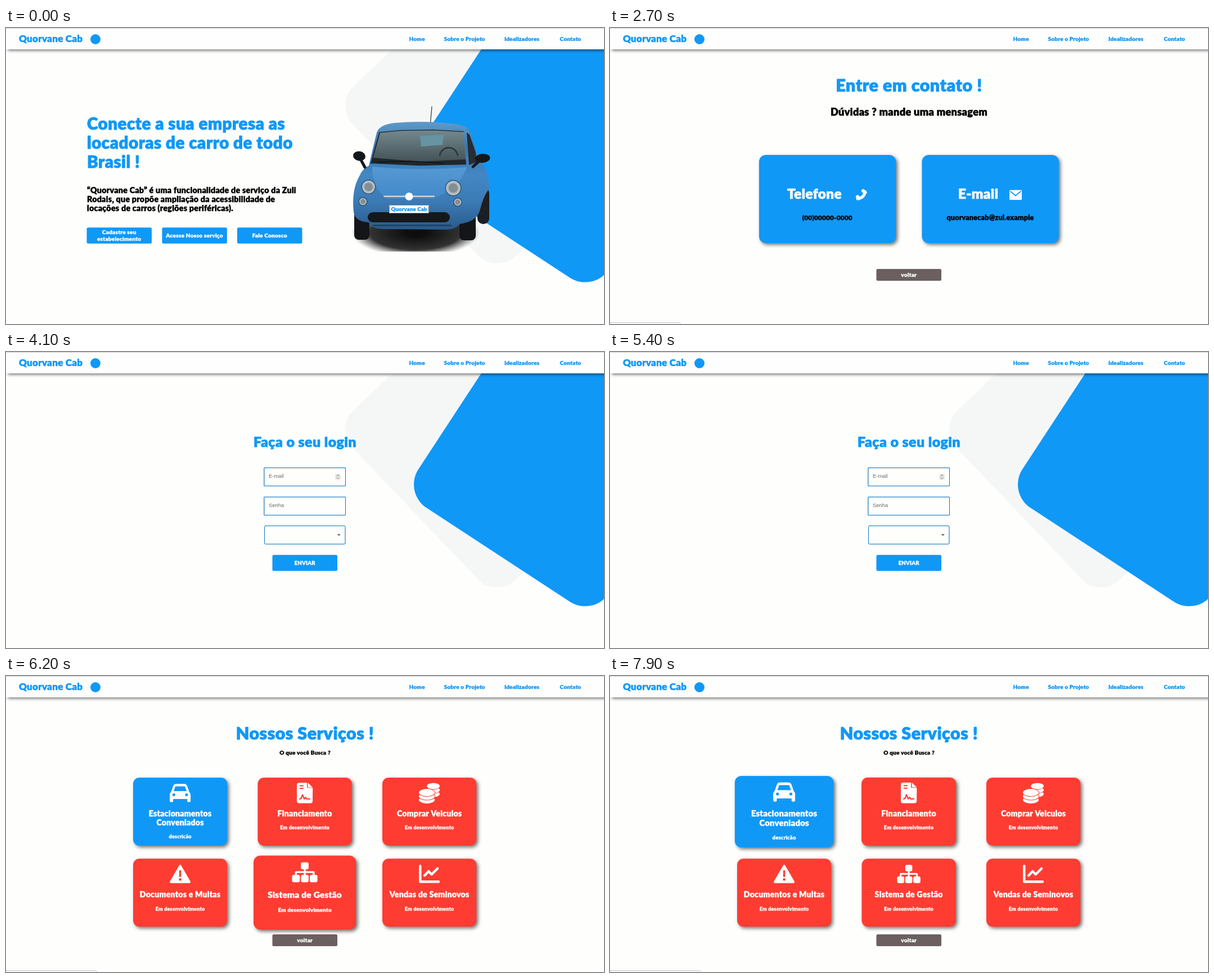
An HTML page with a canvas for the animation above (8 s loop, 1063 by 527 pixels).

```html
<!DOCTYPE html>
<html lang="pt-BR">
<head>
<meta charset="utf-8">
<title>Quorvane Cab</title>
<style>
html, body { margin: 0; width: 100%; height: 100%; overflow: hidden; background: #fefefd; }
canvas { display: block; width: 1063px; height: 527px; }
</style>
</head>
<body>
<canvas id="stage"></canvas>
<script>
const W = 1063, H = 527, LOOP = 8000;
const BLUE = '#1098f7', RED = '#ff3c32', GREY = '#6b5f5f', PAPER = '#fefefd', INK = '#000';
const BRAND = 'Quorvane Cab';
const canvas = document.getElementById('stage');
const dpr = window.devicePixelRatio || 1;
canvas.width = W * dpr;
canvas.height = H * dpr;
const c = canvas.getContext('2d');

// ---- helpers ----
function label(str, x, y, size, color) {
  c.font = `400 ${size}px "Liberation Sans", Arial, sans-serif`;
  c.letterSpacing = '0px';
  c.textAlign = 'left';
  c.fillStyle = color;
  c.fillText(str, x, y);
}

// Heavy display text; the thin round outline softens and thickens the letters
function text(str, x, y, size, color, align = 'left') {
  c.font = `900 ${size}px Lato, sans-serif`;
  c.letterSpacing = size * 0.016 + 'px';
  c.textAlign = align;
  c.fillStyle = c.strokeStyle = color;
  c.lineWidth = size * 0.03;
  c.fillText(str, x, y);
  c.strokeText(str, x, y);
}

function box(x, y, w, h, r, color) {
  c.beginPath();
  c.roundRect(x, y, w, h, r);
  c.fillStyle = color;
  c.fill();
}

function frame(x, y, w, h, r, color, width = 1) {
  c.beginPath();
  c.roundRect(x, y, w, h, r);
  c.strokeStyle = color;
  c.lineWidth = width;
  c.stroke();
}

function trace(pts) {
  c.beginPath();
  pts.forEach(([x, y], i) => i ? c.lineTo(x, y) : c.moveTo(x, y));
}

function poly(pts, color) {
  trace(pts);
  c.closePath();
  c.fillStyle = color;
  c.fill();
}

function line(pts, color, width) {
  trace(pts);
  c.strokeStyle = color;
  c.lineWidth = width;
  c.stroke();
}

function oval(x, y, rx, ry, color, tilt = 0) {
  c.beginPath();
  c.ellipse(x, y, rx, ry, tilt, 0, 7);
  c.fillStyle = color;
  c.fill();
}

function shade(y0, y1, ...colors) {
  const g = c.createLinearGradient(0, y0, 0, y1);
  colors.forEach((k, i) => g.addColorStop(i / (colors.length - 1), k));
  return g;
}

function withShadow(offset, blur, alpha, draw) {
  c.save();
  c.shadowColor = `rgba(0,0,0,${alpha})`;
  c.shadowOffsetX = c.shadowOffsetY = offset * dpr;
  c.shadowBlur = blur * dpr;
  draw();
  c.restore();
}

function button(x, y, h, lines, color = BLUE, size = 10.2) {
  box(x, y, 115.5, h, 2.5, color);
  lines.forEach((s, i) =>
    text(s, x + 57.7, y + h / 2 + 3.6 + (i - (lines.length - 1) / 2) * 12, size, '#fff', 'center'));
}

// CSS "ease" curve, solved by bisection
function ease(p) {
  if (p <= 0) return 0;
  if (p >= 1) return 1;
  const bez = (a, b, s) => 3 * a * s * (1 - s) ** 2 + 3 * b * s * s * (1 - s) + s ** 3;
  let lo = 0, hi = 1;
  for (let i = 0; i < 18; i++) {
    const mid = (lo + hi) / 2;
    if (bez(0.25, 0.25, mid) < p) lo = mid; else hi = mid;
  }
  return bez(0.1, 1, lo);
}

// ---- shared parts ----
function header() {
  withShadow(2.5, 5, 0.5, () => box(0, 0, W + 20, 38, 0, '#fefefe'));
  box(0, 0, W, 1, 0, '#cfcfcf');
  text(BRAND, 23, 24.5, 17, BLUE);
  oval(159, 20, 9, 9, BLUE);
  [['Home', 716.5], ['Sobre o Projeto', 778.5], ['Idealizadores', 886], ['Contato', 984.5]]
    .forEach(([s, x]) => text(s, x, 23, 10.1, BLUE));
}

// Rounded, tilted square starting from its left corner
function tile(x, y, dx, dy, r, color) {
  const q = [[x, y], [x + dx, y + dy], [x + dx + dy, y + dy - dx], [x + dy, y - dx]];
  c.beginPath();
  c.moveTo((q[0][0] + q[3][0]) / 2, (q[0][1] + q[3][1]) / 2);
  for (let i = 0; i < 4; i++) c.arcTo(...q[i], ...q[(i + 1) % 4], r);
  c.closePath();
  c.fillStyle = color;
  c.fill();
}

function backdrop() {
  tile(583.4, 136.8, 288, 301.8, 47, '#f5f7f7');
  tile(705.8, 250.2, 338.2, 221.6, 50, BLUE);
}

function statusBar(w) {
  box(-6, 524.5, w + 6, 12, 3, '#fbfbfb');
  frame(-6, 524.5, w + 5.5, 12, 3, '#c4c4c4');
}

// ---- home ----
function car() {
  c.save();
  c.beginPath();
  c.rect(612, 136, 252, 262);
  c.clip();

  // ground shadow
  c.save();
  c.translate(728, 364);
  c.scale(1, 0.38);
  const g = c.createRadialGradient(0, 0, 20, 0, 0, 114);
  g.addColorStop(0, '#0e0e0e');
  g.addColorStop(0.65, 'rgba(28,28,28,.9)');
  g.addColorStop(1, 'rgba(60,60,60,0)');
  oval(0, 0, 114, 114, g);
  c.restore();

  // tyres
  box(838, 284, 21, 65, 10, '#1b1e22');
  box(619, 322, 27, 55, 8, '#141518');
  box(806, 322, 29, 56, 8, '#141518');
  line([[754.5, 168], [757, 140]], '#3b3b3b', 1.3);

  // body
  c.beginPath();
  c.moveTo(659, 186);
  c.quadraticCurveTo(664, 172, 690, 169);
  c.quadraticCurveTo(745, 164, 800, 171);
  c.quadraticCurveTo(822, 174, 827, 190);
  c.lineTo(839, 232);
  c.quadraticCurveTo(859, 252, 859, 286);
  c.quadraticCurveTo(848, 300, 842, 326);
  c.quadraticCurveTo(836, 345, 806, 349);
  c.quadraticCurveTo(800, 359, 780, 359);
  c.lineTo(670, 358);
  c.quadraticCurveTo(648, 357, 645, 346);
  c.quadraticCurveTo(621, 345, 618, 328);
  c.quadraticCurveTo(614, 288, 628, 264);
  c.quadraticCurveTo(634, 250, 645, 245);
  c.closePath();
  c.fillStyle = shade(166, 358, '#5f9bc9', '#3a76ad', '#4387c4', '#3b7ab4', '#2a5a8a');
  c.fill();

  // glass
  poly([[664, 186], [700, 182], [760, 181], [813, 184], [818, 243], [735, 245], [649, 241]],
    shade(181, 245, '#74898f', '#596b70', '#3d4a4f'));
  poly([[736, 192], [778, 190], [776, 208], [738, 211]], '#6794a1');
  poly([[652, 231], [735, 238], [817, 234], [818, 243], [735, 245], [649, 241]], '#20272b');
  c.beginPath();
  c.arc(787, 229, 16, 3.3, 6.1);
  c.strokeStyle = '#30393d';
  c.lineWidth = 3;
  c.stroke();
  line([[660, 239], [718, 237], [778, 241]], '#111', 1.6);
  line([[664, 186], [649, 241]], '#22292e', 2);
  line([[664, 186], [700, 182.5], [760, 181.5], [813, 184.5]], '#2b3439', 1.5);
  poly([[819, 186], [824, 190], [835, 222], [836, 239], [823, 244]], '#262d33');

  // bonnet
  c.beginPath();
  c.moveTo(651, 247);
  c.quadraticCurveTo(735, 255, 819, 248);
  c.quadraticCurveTo(806, 286, 758, 304);
  c.lineTo(676, 304);
  c.quadraticCurveTo(650, 282, 651, 247);
  c.fillStyle = shade(247, 304, '#559ad4', '#4388c8');
  c.fill();

  // mirrors
  line([[631, 235], [638, 248]], '#15181b', 5);
  oval(628, 228, 11, 8.5, '#15181b', 0.15);
  line([[840, 238], [830, 247]], '#15181b', 5);
  oval(847, 232, 13.5, 8, '#15181b', -0.1);

  // lamps
  for (const [x, y, r] of [[644.5, 283, 13], [795, 285, 14.5], [634.5, 309, 8], [803, 310, 8]]) {
    oval(x, y, r, r, '#2c557c');
    oval(x, y, r - 1.5, r - 1.5, '#b3bdc2');
    oval(x, y, r * 0.58, r * 0.58, '#848f94');
  }
  box(671, 298.5, 91, 2.6, 1.3, '#ccd6dc');
  oval(716.5, 300, 7, 7, '#fff');

  // bumper
  box(643, 328, 146, 18, 9, '#15181b');
  box(652, 350, 140, 3, 1.5, '#1f4366');
  box(681, 315, 70.5, 15, 1, '#fff');
  frame(681.5, 315.5, 69.5, 14, 1, '#7d95a8');
  text(BRAND, 716.5, 326, 9.6, BLUE, 'center');
  c.restore();
}

function home() {
  backdrop();
  ['Conecte a sua empresa as', 'locadoras de carro de todo', 'Brasil !']
    .forEach((s, i) => text(s, 144, 180.7 + i * 34.3, 29.6, BLUE));
  ['“' + BRAND + '” é uma funcionalidade de serviço da Zuli',
    'Rodais, que propõe ampliação da acessibilidade de',
    'locações de carros (regiões periféricas).']
    .forEach((s, i) => text(s, 144, 294.3 + i * 15.9, 14.3, INK));
  button(143.5, 355.3, 28.5, ['Cadastre seu', 'estabelecimento']);
  button(277.4, 355.3, 28.5, ['Acesse Nosso serviço']);
  button(411, 355.3, 28.5, ['Fale Conosco']);
  car();
}

// ---- contact ----
function contact() {
  text('Entre em contato !', 531.5, 113, 30.4, BLUE, 'center');
  text('Dúvidas ? mande uma mensagem', 531.5, 156, 18.2, INK, 'center');
  for (const x of [265, 554.5])
    withShadow(3, 6, 0.55, () => box(x, 226, 243.3, 157, 12, BLUE));
  text('Telefone', 315, 304, 24.3, '#fff');
  text('(00)00000-0000', 386.3, 342, 11.8, INK, 'center');
  text('E-mail', 619, 304, 24.3, '#fff');
  text('quorvanecab@zul.example', 676, 342, 12.5, INK, 'center');

  c.beginPath();
  c.moveTo(453, 291);
  c.quadraticCurveTo(453, 302, 440, 304);
  c.strokeStyle = '#fff';
  c.lineWidth = 5;
  c.stroke();
  line([[450, 290], [453.5, 293]], '#fff', 6);
  line([[440, 300.5], [442.5, 303.5]], '#fff', 6);

  box(710, 288.5, 22, 17.5, 1.5, '#fff');
  line([[712, 291], [721, 298.5], [730, 291]], BLUE, 1.8);
  button(473.5, 429, 21, ['voltar'], GREY);
}

// ---- login ----
function field(y, name, hover) {
  frame(459, y, 144.5, 32.5, 0, BLUE);
  frame(459.5, y + 0.5, 144, 32, 2, hover ? 'rgba(0,0,0,.87)' : 'rgba(0,0,0,.25)');
  label(name, 467, y + 18, 9.4, '#6a6a6a');
}

function login(t) {
  const during = (a, b) => t >= a && t < b;
  backdrop();
  text('Faça o seu login', 531.5, 169, 25, BLUE, 'center');
  field(206, 'E-mail', during(4700, 5000));
  field(258, 'Senha', during(5100, 5200));
  box(585, 217, 10, 10.5, 1, '#e9e9e9');
  line([[588, 220.8], [590, 218.8], [592, 220.8]], '#666', 1);
  line([[588, 223.8], [590, 225.8], [592, 223.8]], '#666', 1);
  frame(459.5, 309.5, 143.5, 32.5, 2, BLUE);
  frame(459.5, 309.5, 143.5, 32.5, 2, during(5200, 5400) ? 'rgba(0,0,0,.87)' : 'rgba(0,0,0,.23)');
  poly([[588.5, 324.3], [595, 324.3], [591.75, 327.6]], '#666');
  button(473.5, 361.3, 28.5, ['ENVIAR'], BLUE, 9.7);
}

// ---- services ----
const icons = {
  car(bg) {
    c.beginPath();
    c.moveTo(-18.5, 2);
    c.lineTo(-16, -2);
    c.lineTo(-12.5, -12);
    c.quadraticCurveTo(-11, -16, -7, -16);
    c.lineTo(7, -16);
    c.quadraticCurveTo(11, -16, 12.5, -12);
    c.lineTo(16, -2);
    c.lineTo(18.5, 2);
    c.lineTo(18.5, 11);
    c.lineTo(-18.5, 11);
    c.fill();
    box(-18.5, 4, 6, 12.5, 2, '#fff');
    box(12.5, 4, 6, 12.5, 2, '#fff');
    poly([[-8.5, -11.5], [8.5, -11.5], [11.5, -3], [-11.5, -3]], bg);
    oval(-11.3, 3.6, 2.5, 2.5, bg);
    oval(11.3, 3.6, 2.5, 2.5, bg);
  },
  file(bg) {
    box(-14, -18, 28, 36.5, 4, '#fff');
    poly([[4, -19], [15, -19], [15, -8.5], [4, -8.5]], bg);
    poly([[5.5, -18], [14, -9.5], [5.5, -9.5]], '#fff');
    box(-14, -8.5, 28, 10, 0, '#fff');
    line([[-8.5, -12.5], [-3, -12.5]], bg, 2);
    line([[-8.5, -8], [-3, -8]], bg, 2);
    line([[-9, 11], [-6.5, 10], [-4, 3.5], [-1, 11], [1.5, 8], [3.5, 11], [9, 11]], bg, 2.2);
  },
  coins(bg) {
    const stack = (x, y, rx, ry, n, gap) => {
      for (let i = n; i >= 0; i--) {
        oval(x, y + i * gap, rx + 1, ry + 1, bg);
        oval(x, y + i * gap, rx, ry, '#fff');
      }
    };
    stack(7, -12, 11.5, 5.5, 2, 7);
    stack(-4.5, -0.5, 14, 6.5, 2, 6.5);
  },
  warning(bg) {
    const peak = [[0, -14], [16.5, 14.5], [-16.5, 14.5], [0, -14]];
    poly(peak, '#fff');
    line(peak, '#fff', 4);
    line([[0, -5], [0, 4]], bg, 3.4);
    oval(0, 10, 2.3, 2.3, bg);
  },
  tree() {
    box(-6.3, -16, 12.6, 11.5, 3, '#fff');
    line([[0, -6], [0, 6]], '#fff', 3);
    line([[-14.5, 6], [-14.5, 0], [14.5, 0], [14.5, 6]], '#fff', 3);
    for (const x of [-20.7, -6.3, 8.1]) box(x, 4.5, 12.6, 12, 3, '#fff');
  },
  chart() {
    line([[-16.3, -14], [-16.3, 14], [16.3, 14]], '#fff', 4.4);
    line([[-8.5, 3], [-1.5, -4.5], [4, 1], [14.5, -9.5]], '#fff', 4.4);
  }
};

// title lines, icon, hover start, hover end
const cards = [
  [['Estacionamentos', 'Conveniados'], 'car', 7755, 9000],
  [['Financiamento'], 'file', 6860, 7550],
  [['Comprar Veiculos'], 'coins'],
  [['Documentos e Multas'], 'warning'],
  [['Sistema de Gestão'], 'tree', 5895, 6400],
  [['Vendas de Seminovos'], 'chart']
];

function card([title, icon, start, end], i, t) {
  const grow = start ? ease((t - start) / 500) - ease((t - end) / 500) : 0;
  const scale = 1 + 0.1 * grow;
  const color = i ? RED : BLUE;
  const extra = (title.length - 1) * 15.7;
  c.save();
  c.translate(309.6 + i % 3 * 221.5, 241.5 + Math.floor(i / 3) * 144.2);
  c.scale(scale, scale);
  withShadow(3 * scale, 6 * scale, 0.55, () => box(-83.6, -60.5, 167.2, 121, 11, color));
  title.forEach((s, k) => text(s, 0, 8.3 + k * 15.7, 14.1, '#fff', 'center'));
  text(i ? 'Em desenvolvimento' : 'descricão', 0, 31.8 + extra, 9.05, '#fff', 'center');
  c.translate(0, -33.5);
  c.fillStyle = '#fff';
  icons[icon](color);
  c.restore();
}

function services(t) {
  text('Nossos Serviços !', 531.5, 113, 30.4, BLUE, 'center');
  text('O que você Busca ?', 531.5, 139.8, 10.1, INK, 'center');
  button(473.5, 460, 21, ['voltar'], GREY);
  cards.forEach((k, i) => card(k, i, t));
  statusBar(t >= 6800 && t < 7700 ? 194 : 162);
}

// ---- timeline ----
function draw(t) {
  c.setTransform(dpr, 0, 0, dpr, 0, 0);
  c.lineJoin = c.lineCap = 'round';
  box(0, 0, W, H, 0, PAPER);
  if (t < 1400) home();
  else if (t < 3000) {
    contact();
    if (t >= 2700) statusBar(126);
  }
  else if (t < 4100) home();
  else if (t < 5900) login(t);
  else services(t);
  header();
}

const begin = performance.now();
function tick() {
  draw((performance.now() - begin) % LOOP);
  requestAnimationFrame(tick);
}
tick();
</script>
</body>
</html>
```
